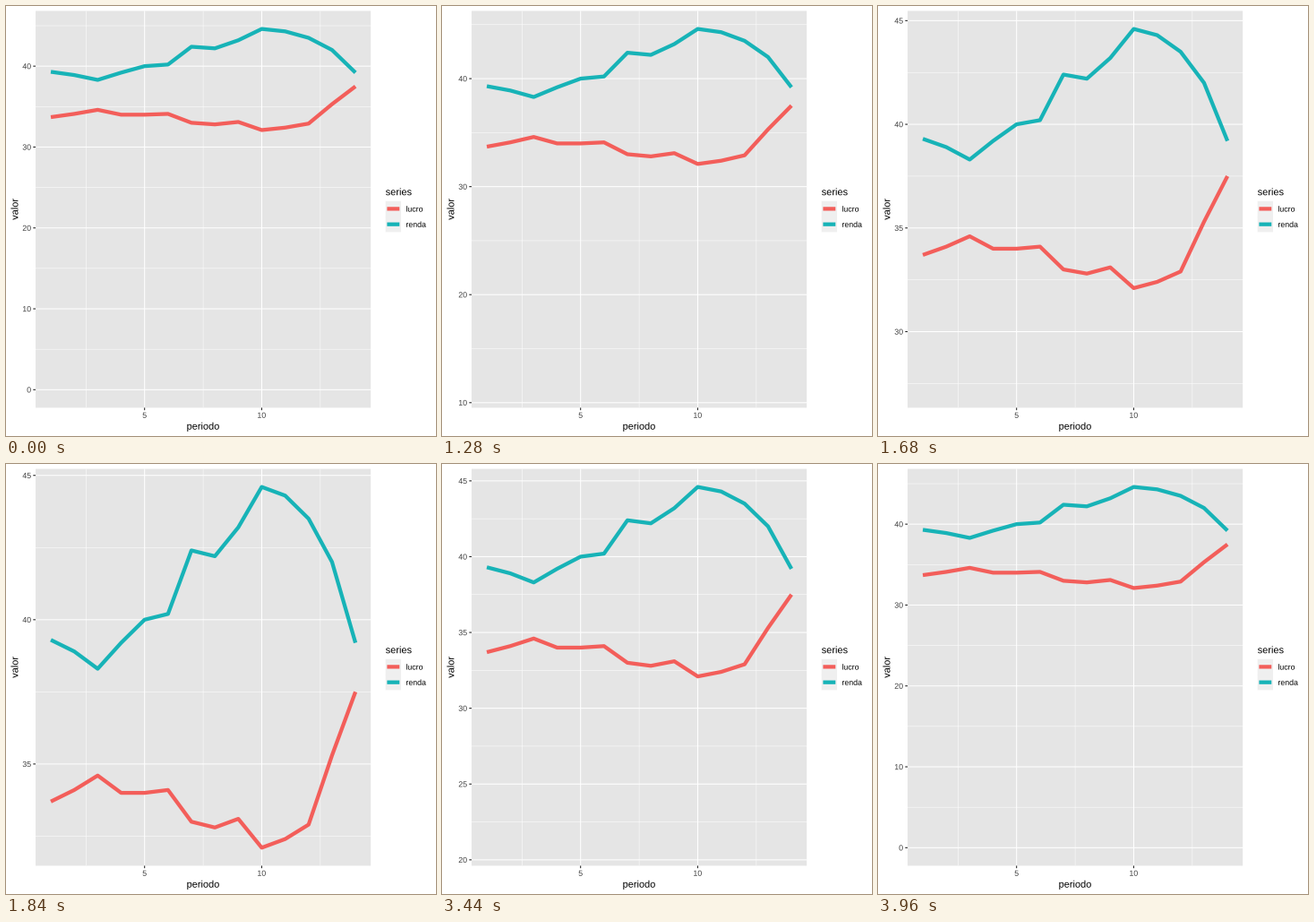
Write a matplotlib script that moves like this. It is 480x480 px and loops after 4000 ms.

```python
import math
from itertools import product

import matplotlib.pyplot as plt
from matplotlib.animation import FuncAnimation
from matplotlib.patches import PathPatch, Rectangle
from matplotlib.textpath import TextPath
from matplotlib.transforms import Affine2D

SIZE, DPI = 480, 72
FRAMES, STEP_MS = 100, 40
LEFT, RIGHT, TOP, BOTTOM = 33.05, 407.1, 5.48, 448.45
PANEL, KEY, TICK, LABEL = "#E5E5E5", "#EFEFEF", "#262626", "#404040"
FONT = {"family": "Liberation Sans"}
SMALL, LARGE = 8.8, 11

SERIES = {
    "lucro": ("#F35E5A", [33.7, 34.1, 34.6, 34, 34, 34.1, 33, 32.8, 33.1,
                          32.1, 32.4, 32.9, 35.3, 37.5]),
    "renda": ("#17B3B7", [39.3, 38.9, 38.3, 39.2, 40, 40.2, 42.4, 42.2, 43.2,
                          44.6, 44.3, 43.5, 42, 39.2]),
}
Y_MAX, ZOOM_MIN, DATA_MIN = 44.6, 32, 32.1
ZOOM_STEPS, ZOOM_IN, ZOOM_OUT = 20, 25, 79

fig = plt.figure(figsize=(SIZE / DPI, SIZE / DPI), dpi=DPI, facecolor="white")
ax = fig.add_axes([0, 0, 1, 1])


def lower_limit(frame):
    if frame <= ZOOM_IN:
        return 0
    if frame <= ZOOM_IN + ZOOM_STEPS:
        return ZOOM_MIN * (frame - ZOOM_IN) / ZOOM_STEPS
    if frame < ZOOM_OUT:
        return DATA_MIN
    return ZOOM_MIN * (1 - (frame - ZOOM_OUT) / ZOOM_STEPS)


def expand(low, high):
    pad = 0.05 * (high - low)
    return low - pad, high + pad


def tick_step(low, high, wanted=5):
    """Pick the first tick and spacing by simplicity, coverage and density."""
    bases = [1, 5, 2, 2.5, 4, 3]
    best, choice = -math.inf, None
    for j, (i, q), k, z in product((1, 2), enumerate(bases), range(2, 11), (0, 1)):
        step = j * q * 10 ** z
        first = (math.floor(high / step) - k + 1) * j
        last = math.ceil(low / step) * j
        for start in range(first, last + 1):
            a = start * step / j
            b = a + step * (k - 1)
            has_zero = a <= 0 <= b and start % j == 0
            simple = 1 - i / (len(bases) - 1) - j + has_zero
            cover = 1 - 0.5 * ((high - b) ** 2 + (low - a) ** 2) / (0.1 * (high - low)) ** 2
            ratio = (k - 1) / (b - a) * (max(b, high) - min(a, low)) / (wanted - 1)
            score = 0.25 * simple + 0.2 * cover + 0.5 * (2 - max(ratio, 1 / ratio))
            if score > best + 1e-9:
                best, choice = score, (a, step)
    return choice


def ticks(low, high):
    """Major and minor positions inside the range."""
    start, step = tick_step(low, high)
    major = [start + n * step for n in range(-2, 14)]
    minor = [m + step / 2 for m in major]
    inside = lambda values: [v for v in values if low <= v <= high]
    return inside(major), inside(minor)


def line(xs, ys, color, width):
    ax.plot(xs, ys, color=color, lw=width, snap=False,
            solid_capstyle="butt", solid_joinstyle="round")


def box(x, y, w, h, color):
    ax.add_patch(Rectangle((x, y), w, h, fc=color, lw=0, snap=False))


def text(x, y, string, size=SMALL, color="black", align=0, angle=0):
    """Baseline text; align is 0 for left, 0.5 for centre, 1 for right."""
    path = TextPath((0, 0), string, size=size, prop=FONT)
    ink = path.get_extents()
    shift = align * (ink.x0 + ink.x1) if align == 0.5 else align * (ink.x1 + 0.35)
    place = Affine2D().translate(-shift, 0).scale(1, -1).rotate_deg(angle).translate(x, y)
    ax.add_patch(PathPatch(place.transform_path(path), fc=color, lw=0, snap=False))


def legend():
    text(423.7, 211.2, "series", LARGE)
    for n, (name, (color, _)) in enumerate(SERIES.items()):
        mid = 226.4 + 17.28 * n
        box(423.7, mid - 8.64, 17.28, 17.28, KEY)
        line([425.4, 439.25], [mid, mid], color, 4.27)
        text(446.4, mid + 3.15, name)


def draw(frame):
    ax.clear()
    ax.set(xlim=(0, SIZE), ylim=(SIZE, 0))
    ax.axis("off")

    x0, x1 = expand(1, 14)
    y0, y1 = expand(lower_limit(frame), Y_MAX)
    px = lambda v: LEFT + (v - x0) / (x1 - x0) * (RIGHT - LEFT)
    py = lambda v: BOTTOM - (v - y0) / (y1 - y0) * (BOTTOM - TOP)

    major, minor = ticks(y0, y1)
    box(LEFT, TOP, RIGHT - LEFT, BOTTOM - TOP, PANEL)
    for ys, xs, width in ((minor, (2.5, 7.5, 12.5), 0.53), (major, (5, 10), 1.07)):
        for v in ys:
            line([LEFT, RIGHT], [py(v)] * 2, "white", width)
        for v in xs:
            line([px(v)] * 2, [TOP, BOTTOM], "white", width)

    for color, values in SERIES.values():
        line([px(n) for n in range(1, 15)], [py(v) for v in values], color, 4.27)

    for v in major:
        line([LEFT - 2.74, LEFT], [py(v)] * 2, TICK, 1.07)
        text(28.1, py(v) + 3.15, f"{v:g}", color=LABEL, align=1)
    for v in (5, 10):
        line([px(v)] * 2, [BOTTOM, BOTTOM + 2.74], TICK, 1.07)
        text(px(v), 459.8, str(v), color=LABEL, align=0.5)

    text((LEFT + RIGHT) / 2, 472.7, "periodo", LARGE, align=0.5)
    text(13.4, (TOP + BOTTOM) / 2, "valor", LARGE, align=0.5, angle=-90)
    legend()
    return []


anim = FuncAnimation(fig, draw, frames=FRAMES, interval=STEP_MS,
                     init_func=lambda: draw(0), repeat=True, repeat_delay=0)
plt.show()
```
